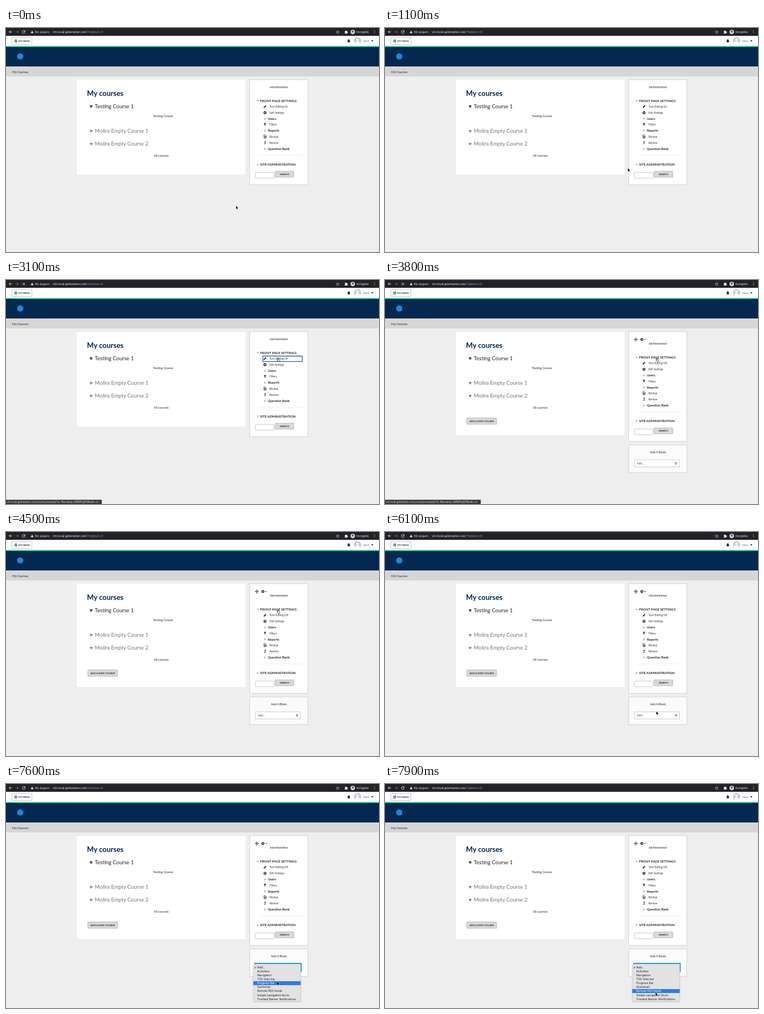
An HTML page that plays this animation: 668 px wide and 402 px high, repeating every 8 s.

```html
<!DOCTYPE html>
<html lang="en">
<head>
<meta charset="utf-8">
<title>My courses</title>
<style>
html, body { margin: 0; width: 100%; height: 100%; overflow: hidden; background: #eee; }
svg { display: block; width: 668px; height: 402px; }
text { font-family: Lato, sans-serif; white-space: pre; }
.ui { font-family: Inter, sans-serif; }
</style>
</head>
<body>
<svg id="stage" viewBox="0 0 668 402" xmlns="http://www.w3.org/2000/svg"></svg>
<script>
const LOOP = 8000, ROW = 7.1, ROW0 = 329;
const NAVY = '#04284f', INK = '#262626', GREY = '#757575';
const HOST = 'vtn.local.getsmarter.com';
const OPTIONS = ['Add...', 'Activities', 'Navigation', 'TOV Side bar', 'Progress Bar', 'Quickmail',
  'Remote RSS feeds', 'Simple navigation block', 'Tracked Banner Notifications'];

// Text is placed by the middle of its capitals.
const text = (x, mid, size, str, fill = INK, extra = '') =>
  `<text x="${x}" y="${(mid + size * 0.36).toFixed(2)}" font-size="${size}" fill="${fill}" ${extra}>${str}</text>`;
const bold = (x, mid, size, str, fill = INK, extra = '') =>
  text(x, mid, size, str, fill, 'font-weight="700" ' + extra);
const ui = (x, mid, size, str, fill, extra = '') => text(x, mid, size, str, fill, 'class="ui" ' + extra);
const rect = (x, y, w, h, fill, extra = '') =>
  `<rect x="${x}" y="${y}" width="${w}" height="${h}" fill="${fill}" ${extra}/>`;
const path = (d, fill = INK, extra = '') => `<path d="${d}" fill="${fill}" ${extra}/>`;
const line = (d, color = INK, w = 0.9) => path(d, 'none', `stroke="${color}" stroke-width="${w}"`);
const circle = (x, y, r, fill, extra = '') => `<circle cx="${x}" cy="${y}" r="${r}" fill="${fill}" ${extra}/>`;
const group = (id, body, extra = '') => `<g id="${id}" ${extra}>${body}</g>`;
const at = (x, y, body) => `<g transform="translate(${x} ${y})">${body}</g>`;
const CENTER = 'text-anchor="middle"';

const gear = (x, y) => at(x, y,
  circle(0, 0, 1.7, 'none', `stroke="${INK}" stroke-width="1.4"`) +
  circle(0, 0, 2.5, 'none', `stroke="${INK}" stroke-width=".8" stroke-dasharray="1 .96"`));
const chevron = (x, y, open) => line(open ? `M${x - 1.6} ${y - 0.8}l1.6 1.6l1.6 -1.6` : `M${x - 0.8} ${y - 1.6}l1.6 1.6l-1.6 1.6`, INK, 0.8);
const button = (x, y, w, h, label, size) =>
  rect(x, y, w, h, '#d8d8d8', 'stroke="#b4b4b4" stroke-width=".8" rx=".6"') +
  bold(x + w / 2, y + h / 2, size, label, INK, CENTER);

function browserBar() {
  return rect(0, 0, 668, 14, '#222327') +
    line('M10.6 7H5.6M8 4.6L5.6 7L8 9.4', '#e4e5e7') +
    line('M17.4 7H22.4M20 4.6L22.4 7L20 9.4', '#717276') +
    group('reload', line('M33.6 5.2A2.5 2.5 0 1 0 34.3 7.6', '#e4e5e7') + path('M34.6 4V6.7H31.9Z', '#e4e5e7')) +
    group('stop', line('M29.7 4.9l4.4 4.4M34.1 4.9l-4.4 4.4', '#e4e5e7')) +
    path('M46.8 4.5L49.4 9.3H44.2Z', '#e8eaed') + rect(46.5, 6.2, 0.6, 1.5, '#222327') +
    ui(52, 7.1, 5.25, 'No seguro', '#e8eaed') +
    ui(84, 7.1, 5.13, HOST + '<tspan fill="#9aa0a6">/?redirect=0</tspan>', '#f1f3f4') +
    path('M594 4.5l.8 1.8l1.9 .2l-1.4 1.3l.4 1.9l-1.7 -1l-1.7 1l.4 -1.9l-1.4 -1.3l1.9 -.2Z', 'none', 'stroke="#d5d7da" stroke-width=".6"') +
    path('M606.6 5.5h1.5a.9 .9 0 0 1 1.8 0h1.5v1.4a.9 .9 0 0 1 0 1.8v1.2h-4.8v-1.2a.9 .9 0 0 0 0 -1.8Z', '#e8eaed') +
    circle(621, 7.1, 3.9, '#f1f3f4') + rect(618.6, 6.3, 4.8, 0.7, '#222327') + rect(619.6, 4.7, 2.8, 1.6, '#222327') +
    circle(619.8, 8.5, 0.8, '#222327') + circle(622.2, 8.5, 0.8, '#222327') +
    ui(628, 7.1, 4.95, 'Incógnito', '#f1f3f4') +
    [4.9, 7, 9.1].map(y => circle(660, y, 0.6, '#e4e5e7')).join('');
}

function siteHeader() {
  return rect(0, 14, 668, 18, '#fff') +
    rect(10.5, 17, 36, 12.5, '#fff', 'stroke="#b8b8b8" stroke-width=".8" rx="1"') +
    line('M15 21.5h5M15 23.3h5M15 25.1h5', INK, 0.9) +
    bold(22, 23.4, 4.4, 'MY MENU') +
    path('M611.4 24.8c1 -.8 .6 -3.8 2.1 -4.2v-.5h1v.5c1.5 .4 1.1 3.4 2.1 4.2v.4h-5.2ZM613.2 25.6h1.6a.8 .8 0 0 1 -1.6 0Z', '#222') +
    circle(629.5, 23, 6.5, '#c6cbce') + circle(629.5, 21.2, 2.3, '#fff') +
    path('M625.2 27.6c0 -5 8.6 -5 8.6 0a6.2 6.2 0 0 1 -8.6 0Z', '#fff') +
    text(640, 23.2, 4.55, 'RAUL', '#666') +
    path('M654 22h4l-2 2.4Z', '#222') +
    rect(0, 32, 668, 2, '#2fe39b') +
    rect(0, 34, 668, 35, NAVY) +
    circle(25.5, 51, 5.6, '#1c86dc') +
    rect(0, 69, 668, 18, '#d6d6d6') +
    text(11, 79, 5.6, 'My Courses');
}

function courseList() {
  const row = (y, label, color) =>
    path(`M149.3 ${y - 0.6}l3.2 -1.4l3.2 1.4l-3.2 1.4Z`, color) +
    path(`M150.7 ${y + 0.5}l1.8 .8l1.8 -.8v1.2q-1.8 1 -3.6 0Z`, color) +
    text(159, y, 9.55, label, color);
  return `<rect id="card" x="127" y="93" width="302" height="170" fill="#fff"/>` +
    bold(145, 117, 12.9, 'My courses', NAVY) +
    row(140.5, 'Testing Course 1', '#222') +
    text(281.2, 158.4, 5.55, 'Testing Course', INK, CENTER) +
    row(184.8, 'Molira Empty Course 1', GREY) +
    row(207.8, 'Molira Empty Course 2', GREY) +
    text(278, 229, 5.6, 'All courses', INK, CENTER) +
    group('newCourse', button(146.5, 247.5, 53.5, 11.5, 'ADD A NEW COURSE', 4.45));
}

function adminBlock() {
  const branch = (y, label) => chevron(463.7, y, false) + bold(469, y, 5.9, label);
  const leaf = (y, label, id = '') => text(472, y, 4.78, label, '#333', id && `id="${id}"`);
  return `<rect id="side" x="436.5" y="92.8" width="104" height="188.6" fill="#fff" stroke="#cfcfcf" stroke-width=".9"/>` +
    group('tools',
      line('M446.4 106.8h5.6M449.2 104v5.6', INK, 0.9) +
      path('M449.2 103.2l1.3 1.5h-2.6ZM449.2 110.4l1.3 -1.5h-2.6ZM445.6 106.8l1.5 -1.3v2.6ZM452.8 106.8l-1.5 -1.3v2.6Z') +
      gear(460, 106.8) + path('M464.2 106.2h3l-1.5 1.8Z')) +
    group('admin',
      text(488.7, 106, 5.1, 'Administration', INK, CENTER) +
      chevron(451, 130.6, true) + bold(455, 130.7, 5.93, 'FRONT PAGE SETTINGS') +
      path('M461.4 143.5l.4 -1.7l3.2 -3.2l1.3 1.3l-3.2 3.2Z') + leaf(141, 'Turn Editing On', 'toggle') +
      gear(463.8, 152) + leaf(152.2, 'Edit Settings') +
      branch(163, 'Users') +
      path('M461.3 170.9h5l-1.9 2.3v2.8l-1.2 -.9v-1.9Z') + leaf(173.5, 'Filters') +
      branch(184.2, 'Reports') +
      path('M461.9 192h2.8l1.3 1.3v4.2h-4.1Z', '#fff', `stroke="${INK}" stroke-width=".8"`) + rect(463, 194, 1.8, 2.4, INK) +
      leaf(194.8, 'Backup') +
      line('M462.2 207.8h2v-4', INK, 0.9) + path('M464.2 202.8l1.6 1.9h-3.2Z') + leaf(205.8, 'Restore') +
      branch(217, 'Question Bank') +
      path('M454 228.5H532', 'none', 'stroke="#d2d2d2" stroke-width=".6" stroke-dasharray="1.5 1"') +
      chevron(450.6, 244.9, false) + bold(455, 245, 5.87, 'SITE ADMINISTRATION') +
      rect(446.6, 259.2, 33.2, 10.2, '#fff', 'stroke="#bdbdbd" stroke-width=".8" rx="1"') +
      button(481.8, 257, 33.6, 10.8, 'SEARCH', 4.35)) +
    group('focus', rect(460, 136.5, 70.6, 9.8, 'none', 'stroke="#2a5db5" stroke-width="1.3" rx=".6"'));
}

function addBlock() {
  return group('addBlock',
    rect(436.5, 296, 104, 49.6, '#fbfbfb', 'stroke="#cfcfcf" stroke-width=".9"') +
    text(488.7, 309.5, 5.35, 'Add A Block', INK, CENTER) +
    rect(446.5, 322.8, 81, 12.6, '#fff', 'stroke="#c4c4c4" stroke-width=".8"') +
    text(451, 329.2, 5.1, 'Add...', '#555') +
    path('M519.7 328.6l1.5 -2l1.5 2ZM519.7 329.6l1.5 2l1.5 -2Z', '#333'));
}

function popup() {
  const items = OPTIONS.map((s, i) => ui(450, ROW0 + i * ROW, 5.1, s, '#1c1c1c', 'data-option')).join('');
  return group('popup',
    rect(445.6, 321.9, 83, 14.4, 'none', 'stroke="#19a3c4" stroke-width="1.9"') +
    rect(442.4, 324.2, 86, 67.6, '#000', 'opacity=".12" rx="2"') +
    rect(442.8, 323.7, 85, 67, '#e2e2e2', 'stroke="#bcbcbc" stroke-width=".5" rx="1.5"') +
    `<rect id="mark" x="442.8" width="85" height="${ROW}" fill="#2f7be6"/>` + items +
    `<path id="tick" d="M445.2 329.2l1.1 1.4l1.7 -3" fill="none" stroke-width=".8"/>`);
}

function statusBar() {
  return group('status',
    rect(0, 394.4, 171.5, 8, '#35363a') +
    ui(1.5, 398.4, 4.42, HOST + '/course/view.php?id=1&amp;sesskey=IMBMYgIO8&amp;edit=on', '#e6e7e9'));
}

const outlined = 'stroke-linejoin="round" paint-order="stroke"';
const cursors =
  group('arrow', path('M0 0V5.6L1.3 4.5L2.2 6.5L3.1 6.1L2.2 4.2H3.9Z', '#000', `stroke="#fff" stroke-width=".7" ${outlined}`)) +
  group('hand', path('M-.5 .5q.5 -.8 1 0V2.5l2.5 .7q.6 .3 .4 1.2L2.8 6.7H0L-1.7 4.3q-.2 -.8 .5 -.6l.7 .6Z', '#fff', 'stroke="#111" stroke-width=".7" stroke-linejoin="round"'));

const stage = document.getElementById('stage');
stage.innerHTML = rect(0, 0, 668, 402, '#eee') + browserBar() + siteHeader() + courseList() +
  adminBlock() + addBlock() + popup() + statusBar() + cursors;
const el = id => document.getElementById(id);
const options = [...stage.querySelectorAll('[data-option]')];

const ease = {
  linear: u => u,
  in: u => u * u,
  out: u => 1 - (1 - u) * (1 - u),
  both: u => u * u * (3 - 2 * u)
};
// time, x, y, easing of the move that ends there
const route = [
  [0, 412, 319, 'linear'], [500, 412, 319, 'linear'], [600, 412, 318.6, 'linear'], [700, 412, 318.6, 'linear'],
  [1600, 467, 158, 'both'], [2000, 487, 139.4, 'out'], [4500, 487, 139.4, 'linear'],
  [4900, 480, 144.5, 'in'], [5350, 461.5, 215, 'both'], [5800, 481, 301, 'both'],
  [6100, 486, 322, 'out'], [6500, 486.6, 325.5, 'out'], [7200, 486.6, 325.5, 'linear'], [7900, 484.6, 374, 'both']
];

function pointer(t) {
  const i = route.findIndex(k => k[0] > t);
  if (i < 0) return route[route.length - 1].slice(1, 3);
  const a = route[i - 1], b = route[i];
  const u = ease[b[3]]((t - a[0]) / (b[0] - a[0]));
  return [a[1] + (b[1] - a[1]) * u, a[2] + (b[2] - a[2]) * u];
}

const show = (id, on) => el(id).setAttribute('visibility', on ? 'visible' : 'hidden');

function draw(now) {
  const t = Math.floor((now % LOOP) / 100) * 100;
  const editing = t >= 3400, loading = t >= 3100 && t < 4100, open = t >= 7000;
  const [x, y] = pointer(t);

  show('reload', !loading);
  show('stop', loading);
  show('focus', t >= 3100 && !editing);
  ['newCourse', 'tools', 'addBlock'].forEach(id => show(id, editing));
  el('card').setAttribute('height', editing ? 185.3 : 170);
  el('side').setAttribute('height', editing ? 197 : 188.6);
  el('admin').setAttribute('transform', `translate(0 ${editing ? 8.3 : 0})`);
  el('toggle').textContent = editing ? 'Turn Editing Off' : 'Turn Editing On';
  el('status').setAttribute('opacity', t < 2200 || t >= 4200 ? 0 : t === 2200 || t === 4100 ? 0.5 : 1);

  show('popup', open);
  const pick = Math.max(0, Math.round((y - ROW0) / ROW));
  el('mark').setAttribute('y', ROW0 - ROW / 2 + pick * ROW);
  options.forEach((o, i) => o.setAttribute('fill', i === pick ? '#fff' : '#1c1c1c'));
  el('tick').setAttribute('stroke', pick ? '#1c1c1c' : '#fff');

  const link = t >= 1800 && t < 4700;
  show('arrow', !link);
  show('hand', link);
  el(link ? 'hand' : 'arrow').setAttribute('transform', `translate(${x.toFixed(2)} ${y.toFixed(2)})`);
}

const start = performance.now();
function tick() {
  draw(performance.now() - start);
  requestAnimationFrame(tick);
}
tick();
</script>
</body>
</html>
```
